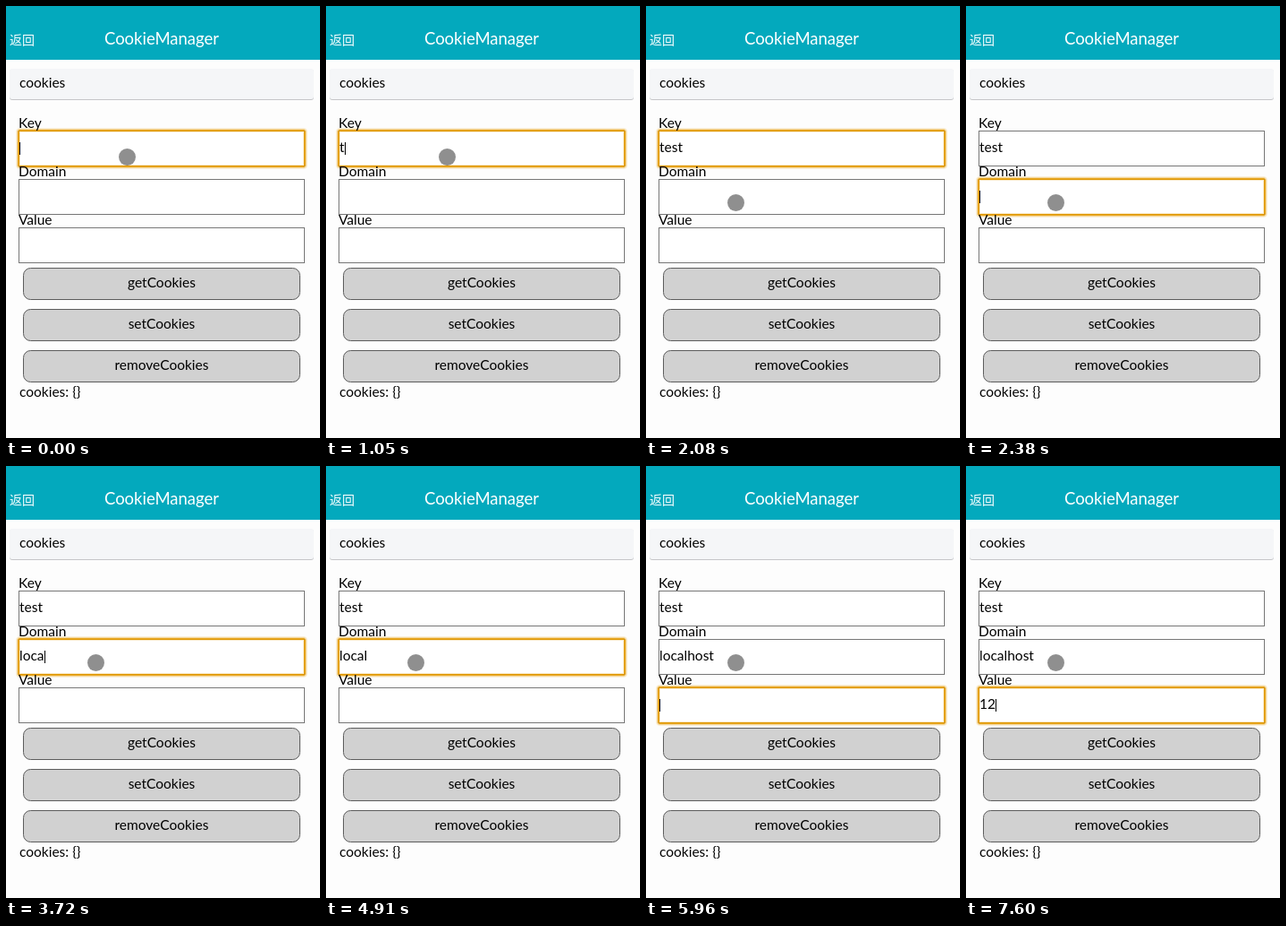
These frames come from a looping animation (351x482 px, 8000 ms). An HTML page:

```html
<!DOCTYPE html>
<html lang="en">
<head>
<meta charset="utf-8">
<title>Cookie form</title>
<style>
  html, body { margin: 0; width: 100%; height: 100%; overflow: hidden; background: #fdfdfd; }
  svg { display: block; width: 351px; height: 482px; }
  text { font: 15.5px Lato, sans-serif; fill: #000; }
  .title { font-size: 18.5px; fill: #fff; }
  .back { font: 500 14px "Noto Sans CJK SC", "Noto Sans CJK", sans-serif; fill: #fff; }
  .mid { text-anchor: middle; }
  .ring rect { fill: none; stroke: #e59a00; }
</style>
</head>
<body>
<svg id="stage" viewBox="0 0 351 482" xmlns="http://www.w3.org/2000/svg"></svg>
<script>
const NS = 'http://www.w3.org/2000/svg';
const stage = document.getElementById('stage');
const LOOP = 8000;

function add(tag, attrs, parent = stage) {
  const el = document.createElementNS(NS, tag);
  for (const k in attrs) el.setAttribute(k, attrs[k]);
  parent.appendChild(el);
  return el;
}

function label(str, x, y, cls = '') {
  const el = add('text', { x, y, class: cls });
  el.textContent = str;
  return el;
}

// Header and section bar
add('rect', { width: 351, height: 482, fill: '#fdfdfd' });
add('rect', { width: 351, height: 60, fill: '#03a9bd' });
label('返回', 4, 43, 'back');
label('CookieManager', 174, 43, 'title mid');
add('rect', { x: 4, y: 71, width: 340, height: 34, rx: 3, fill: '#c6c6c8' });
add('rect', { x: 4, y: 70, width: 340, height: 34, rx: 3, fill: '#f5f6f8' });
label('cookies', 15, 91);

// Form fields
const fieldTop = i => 139 + 54 * i;
const inputs = ['Key', 'Domain', 'Value'].map((name, i) => {
  const y = fieldTop(i);
  add('rect', { x: 14.5, y: y + .5, width: 319, height: 39, fill: '#fff', stroke: '#767676' });
  return label('', 15, y + 24);
});

// Focus ring, from faint outer glow to solid inner line
const ring = add('g', { class: 'ring' });
[[-2.5, .14], [-1.5, .38], [-.5, .85], [.5, .95], [1.5, .2]].forEach(([d, alpha]) =>
  add('rect', { x: 14 + d, y: d, width: 320 - 2 * d, height: 40 - 2 * d, rx: Math.max(0, 1 - d),
    'stroke-opacity': alpha }, ring));

['Key', 'Domain', 'Value'].forEach((name, i) => label(name, 14, fieldTop(i) - 3));

// Buttons and output
['getCookies', 'setCookies', 'removeCookies'].forEach((name, i) => {
  const y = 292 + 46 * i;
  add('rect', { x: 19.5, y: y + .5, width: 309, height: 35, rx: 8, fill: '#d1d1d1', stroke: '#5c5c5c' });
  label(name, 174, y + 22, 'mid');
});
label('cookies: {}', 15, 436);

const caret = add('rect', { width: 1, height: 14, fill: '#000' });
const pointer = add('circle', { r: 9.5, fill: '#000', 'fill-opacity': .44 });

// [time, typed length] for each field
const typing = [
  { word: 'test', focus: 0, keys: [[1050, 1], [1200, 2], [1340, 3], [1490, 4]] },
  { word: 'localhost', focus: 2380, keys: [[3280, 1], [3570, 3], [3720, 4], [4320, 5],
    [5210, 6], [5360, 7], [5510, 8], [5660, 9]] },
  { word: '12', focus: 5960, keys: [[7300, 1], [7600, 2]] }
];
const caretOff = [[150, 600], [2080, 2380], [2980, 3280], [4910, 5210], [6550, 7000]];
const stops = [[0, 135.5, 168.5], [1940, 129, 198.5], [2080, 100.5, 219.5]];

const latest = (list, t) => list.filter(e => e[0] <= t).pop();

function draw(t) {
  let active = 0;
  typing.forEach(({ word, focus, keys }, i) => {
    if (t >= focus) active = i;
    const key = latest(keys, t);
    const str = word.slice(0, key ? key[1] : 0);
    if (inputs[i].textContent !== str) inputs[i].textContent = str;
  });

  ring.setAttribute('transform', `translate(0 ${fieldTop(active)})`);
  const input = inputs[active];
  const width = input.textContent ? input.getComputedTextLength() : 0;
  caret.setAttribute('x', Math.round(15 + width));
  caret.setAttribute('y', fieldTop(active) + 13);
  const hidden = caretOff.some(([from, to]) => t >= from && t < to);
  caret.setAttribute('visibility', hidden ? 'hidden' : 'visible');

  const [, x, y] = latest(stops, t);
  pointer.setAttribute('cx', x);
  pointer.setAttribute('cy', y);
}

const start = performance.now();
function tick() {
  draw((performance.now() - start) % LOOP);
  requestAnimationFrame(tick);
}
tick();
</script>
</body>
</html>
```
